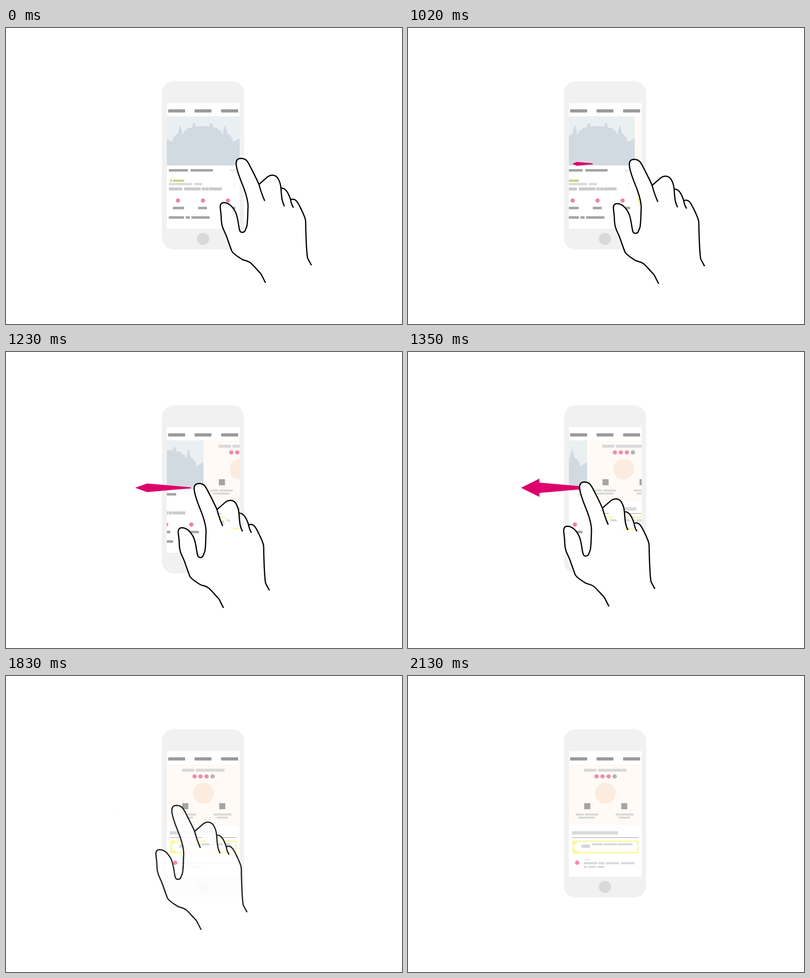
An HTML page with a canvas that plays this animation: 800x600 px, repeating every 2.67 s.

```html
<!DOCTYPE html>
<html lang="en">
<head>
<meta charset="utf-8">
<title>Swipe gesture</title>
<style>
html, body { margin: 0; width: 100%; height: 100%; overflow: hidden; background: #fff; }
canvas { position: absolute; left: 0; top: 0; width: 800px; height: 600px; }
</style>
</head>
<body>
<canvas id="scene" width="800" height="600"></canvas>
<canvas id="hand" width="800" height="600"></canvas>
<script>
const LOOP = 2670, STEP = 30, PAGE = 148;
const handEl = document.getElementById('hand');
const ctx = document.getElementById('scene').getContext('2d');
const hctx = handEl.getContext('2d');

const ramp = (t, start, len) => Math.min(1, Math.max(0, (t - start) / len));
const ease = p => p * p * (3 - 2 * p);

function rect(color, x, y, w, h) {
  ctx.fillStyle = color;
  ctx.fillRect(x, y, w, h);
}

// spans: alternating x, width
function bars(color, y, h, ...spans) {
  for (let i = 0; i < spans.length; i += 2) rect(color, spans[i], y, spans[i + 1], h);
}

function dots(color, y, r, ...xs) {
  ctx.fillStyle = color;
  for (const x of xs) {
    ctx.beginPath();
    ctx.arc(x, y, r, 0, Math.PI * 2);
    ctx.fill();
  }
}

function line(color, width, d) {
  ctx.strokeStyle = color;
  ctx.lineWidth = width;
  ctx.stroke(new Path2D(d));
}

// Left half of the skyline, mirrored around its axis
const AXIS = 397.3;
const half = [
  [336, 231], [337.5, 224], [341, 218.5], [346, 214.5], [348, 213.5], [348, 209], [349.5, 206],
  [350, 201.5], [352, 196.5], [353.5, 201.5], [354.5, 206], [356, 209], [356, 215], [358, 215],
  [360, 208], [366, 207], [367, 202.5], [376.5, 201.5], [377, 195.5], [380, 192], [383, 195.5],
  [383, 200.5], [387, 199]
];
const skyline = [
  [325, 278.5], [325, 224.8], ...half,
  ...half.map(([x, y]) => [2 * AXIS - x, y]).reverse(),
  [473.2, 223.2], [473.2, 278.5]
];

function poly(color, pts) {
  ctx.fillStyle = color;
  ctx.beginPath();
  for (const [x, y] of pts) ctx.lineTo(x, y);
  ctx.fill();
}

function firstPage() {
  rect('#eaeff2', 325, 179, 148.2, 99.5);
  poly('#d2dae1', skyline);
  bars('#a3a3a3', 286, 5, 329, 38.5, 373, 45);
  line('#aaa', 1, 'M453.5 286.8L457.5 290.8L461.5 286.8');
  bars('#c6cf7f', 307.4, 4.2, 331.5, 3.5, 337, 23);
  bars('#dadada', 314.1, 4.6, 329, 47, 380, 16.5);
  line('#ddd', 1, 'M459.5 314L463 317.5L459.5 321');
  bars('#cacaca', 323.2, 6, 329, 27, 360, 33.5, 395.5, 6.5, 402.8, 6.4, 410, 26);
  dots('#ef7fa8', 349.8, 4.2, 347.5, 397.8, 448.3);
  bars('#a3a3a3', 362.4, 5, 337, 23, 388, 18, 433, 30.5);
  bars('#a3a3a3', 381.6, 5, 329, 31, 363, 8.5, 374.5, 37);
}

function secondPage() {
  const gray = '#d9d9d9';
  rect('#fffaf6', 325, 179, 146, 124);
  bars(gray, 188, 6, 355.5, 25, 383.5, 58);
  dots('#f48ab0', 203.5, 4.3, 381, 393, 405.2);
  dots('#b3b3b3', 203.5, 4.3, 417.5);
  dots('#fcebdf', 237.5, 21, 398.7);
  bars('#a5a5a5', 257.8, 12.3, 356, 12.4, 430.8, 12.2);
  bars(gray, 278.7, 4.1, 339, 16, 357, 27, 419.5, 36);
  bars(gray, 285, 4, 344, 34, 425.5, 23);
  bars(gray, 314.6, 6.8, 331, 93.5);
  rect('#98a0a0', 331, 327, 134.5, 1);
  rect('#fff69a', 332, 333.6, 133.6, 25.8);
  rect('#fff', 343, 336.2, 119.8, 20.4);
  dots('#fff', 346.5, 8.3, 343);
  bars('#d5d5d5', 341.7, 6.5, 350.5, 16.5);
  bars(gray, 339, 4.3, 371.5, 22, 395.5, 27, 424.5, 29);
  dots('#f48ab0', 378.5, 4.4, 341.8);
  bars('#f0f0f0', 370, 4, 355, 14);
  bars(gray, 377.3, 4.3, 355, 28, 385, 11.5, 399, 27.5, 430, 28);
  bars(gray, 385, 4.2, 355, 6.5, 364.5, 15, 382.5, 14);
}

function phone(t) {
  const shift = PAGE * ease(ramp(t, 885, 690));
  ctx.fillStyle = '#f1f1f1';
  ctx.beginPath();
  ctx.roundRect(315, 108, 166, 341, 24);
  ctx.fill();
  dots('#d9d9d9', 427.6, 12.3, 398);
  rect('#fff', 325, 152, 147, 255);
  bars('#9a9a9a', 164.8, 6.5, 327.5, 34.3, 381, 34, 434.6, 34.4);

  ctx.save();
  ctx.beginPath();
  ctx.rect(325, 179, 147, 228);
  ctx.clip();
  ctx.translate(-shift, 0);
  firstPage();
  ctx.translate(PAGE, 0);
  secondPage();
  ctx.restore();
}

// Grows leftwards as a sliver, opens its head, then shrinks into the tip
function arrow(t) {
  if (t < 900 || t >= 1860) return;
  const grow = ramp(t, 900, 403), open = ramp(t, 1303, 100);
  const keep = 1 - 0.985 * ramp(t, 1500, 330);
  const base = 373 - 107.5 * grow, neck = 1 + 9.5 * grow;
  const barb = neck + 17 * open;
  const tip = base - 1 - 28 * grow - 17.5 * open;
  const upper = [[base, barb], [base, neck], [373.2, 1]];
  const pts = [[tip, 0], ...upper.map(([x, h]) => [x, -h]), ...upper.reverse()];
  poly('#dc006c', pts.map(([x, y]) => [219 + (x - 219) * keep, 275.3 + y * keep]));
}

const palm = 'M511 317C505 303 498 290 494 282C488 270 485 264.5 475 264.2' +
  'C467 264.2 464.6 269 465 276C466 291 475 310 481 326C486 340 489.5 353 489 364' +
  'C488 375 489 388 486.5 402L482.5 412C479 415.5 473 415.5 471.8 409' +
  'C469 399 469 383 463 372C457 361 449 354 440 354C434 354 432 359 433 366' +
  'C434 374 435 379 435 390C436 404 440 409 445 421L456 452' +
  'C460 459 468 463 477 469C484 472 489 472 494 476C500 481 507 490 514 497C517 501 520 509 524.3 516.3';
const fingers = [
  'M511 317L529 301.3C537 296 546 298 550 306C554 313 555 319 555.5 325C557 348 558 352 562.5 361.5',
  'M555.5 324.5C565 324 570 334 574 345C577 357 577 358 580.8 364',
  'M575.3 348C587 343 592 359 599 373C606 389 605.5 389 605.5 403C606.5 437 607 458 609.5 467L617 480.8'
].map(d => new Path2D(d));
const skin = new Path2D(palm + 'L617 480.8L580.8 364L562 361L522.5 350Z');
const outline = new Path2D(palm + 'M511 317C514 328 517 338 522.7 350.5');

function hand(t) {
  const p = ease(ramp(t, 888, 567));
  const x = -130 * p;
  const y = p * (17.97 + p * (6 * p - 25.97));
  handEl.style.opacity = 1 - ramp(t, 1785, 345);
  hctx.clearRect(0, 0, 800, 600);
  hctx.save();
  hctx.translate(x, y);
  hctx.fillStyle = '#fff';
  hctx.strokeStyle = '#000';
  hctx.lineWidth = 2.5;
  hctx.lineJoin = 'round';
  for (const path of [skin, ...fingers]) hctx.fill(path);
  for (const path of [outline, ...fingers]) hctx.stroke(path);
  hctx.restore();
}

function draw(now) {
  const t = Math.floor((now % LOOP) / STEP) * STEP;
  ctx.clearRect(0, 0, 800, 600);
  phone(t);
  arrow(t);
  hand(t);
}

let start;
function tick(now) {
  start ??= now;
  draw(now - start);
  requestAnimationFrame(tick);
}
draw(0);
requestAnimationFrame(tick);
</script>
</body>
</html>
```
